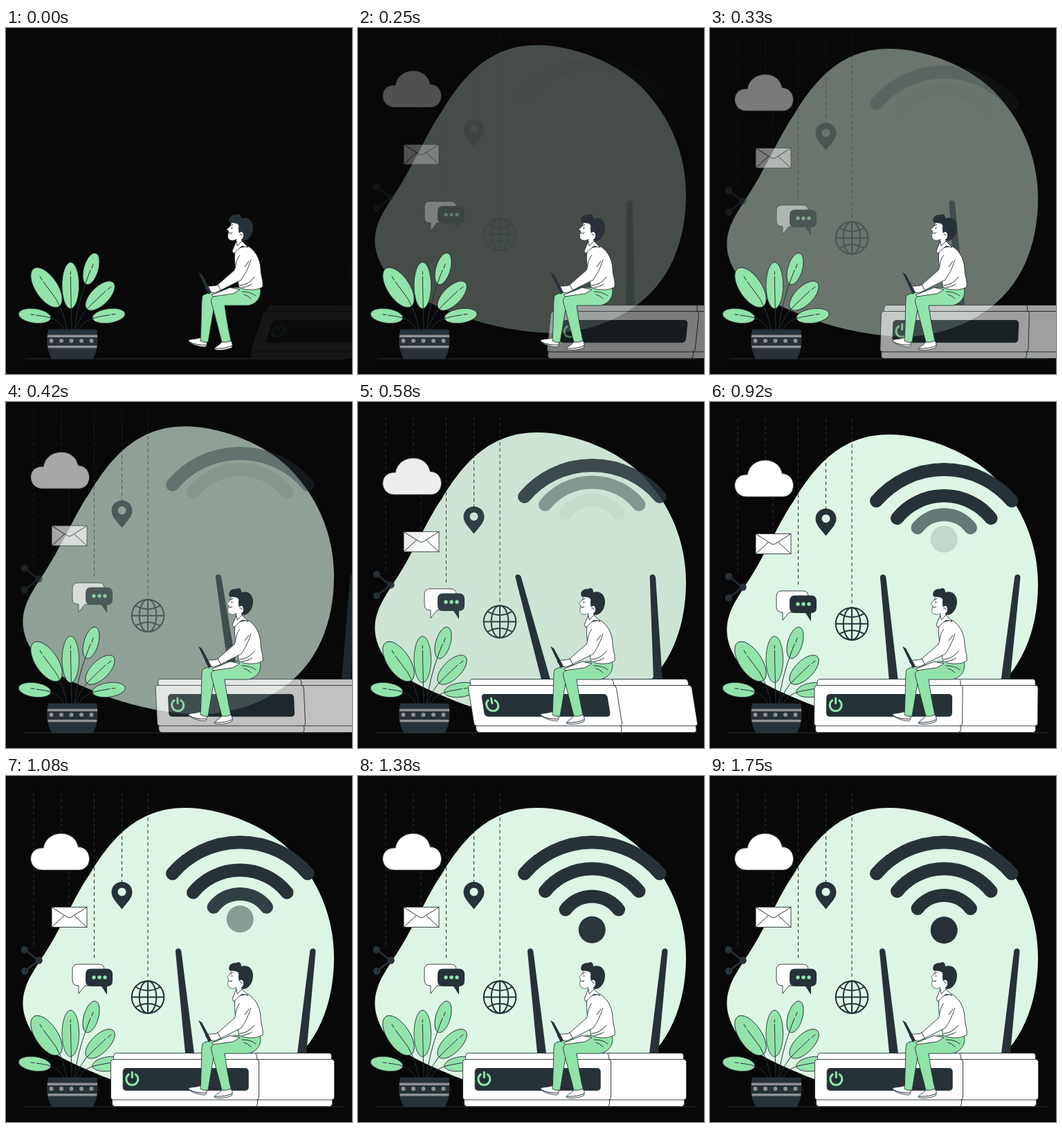
Write an HTML page that moves like this. It is 500 px wide and 500 px high and loops after 1790 ms.

```html
<!DOCTYPE html>
<html lang="en">
<head>
<meta charset="utf-8">
<title>Wireless router</title>
<style>
html, body { margin: 0; width: 100%; height: 100%; overflow: hidden; background: #080808; }
svg { display: block; width: 100vw; height: 100vh; }
.ink { fill: #263238; }
.mint { fill: #92e3a9; }
.white { fill: #fff; }
.out { stroke: #263238; stroke-width: .9; stroke-linejoin: round; }
.line { fill: none; stroke: #263238; stroke-width: 1; stroke-linecap: round; stroke-linejoin: round; }
.dash { stroke-dasharray: 5 4; stroke-linecap: butt; }
.wave { fill: none; stroke: #263238; stroke-width: 19; stroke-linecap: round; }
.grey { fill: #8f9192; }
</style>
</head>
<body>
<svg viewBox="0 0 500 500">
  <path class="line" d="M28 478H490"/>

  <g data-delay="0">
    <path fill="#dcf5e5" d="M258 46C318 46 379 76 410 107C452 150 474 205 474 262C474 330 450 390 398 425C365 449 320 462 278 462C235 462 175 448 140 434C90 413 50 397 33 362C20 335 22 312 38 285C50 265 63 247 75 224C92 194 105 164 121 142C152 90 191 46 258 46Z"/>
  </g>

  <g data-delay="0">
    <path class="line dash" d="M40 24V248M80 24V84M91 136V189M127.500 24V264M167.500 24V153M205 24V291"/>
    <path class="white out" d="M52.500 136C42 136 35.700 128 35.700 119.500C35.700 110 43 103 54 104C56 91 67 83 80 83C93 83 102 91 104.500 102.500C113.500 102.500 120.500 109.500 120.500 119.500C120.500 129 114 136 105 136Z"/>
    <path class="white out" d="M66 189.500H117V218.500H66Z"/>
    <path class="line" d="M66 189.500L88.500 203.800Q91.500 205.800 94.500 203.800L117 189.500M66 218.500L84 202M117 218.500L99 202"/>
    <path class="line" style="stroke-width:2.500" d="M27 251L47 266.500L27 282"/>
    <g class="ink"><circle cx="27" cy="251" r="5.200"/><circle cx="47.500" cy="266.500" r="5.200"/><circle cx="27" cy="282" r="5.200"/></g>
    <path class="white out" d="M104 272H134Q142 272 142 280V295Q142 303 134 303H114L105 314.500V303Q96 303 96 295V280Q96 272 104 272Z"/>
    <path class="ink" d="M123 278.500H146Q154 278.500 154 286.500V296Q154 304 146 304V316L138 304H123Q115 304 115 296V286.500Q115 278.500 123 278.500Z"/>
    <g class="mint"><circle cx="127" cy="291" r="2.700"/><circle cx="135" cy="291" r="2.700"/><circle cx="143" cy="291" r="2.700"/></g>
    <path class="ink" fill-rule="evenodd" d="M167.500 153C176 153 182.500 159.500 182.500 168C182.500 177 173 185 167.500 192.500C162 185 152.500 177 152.500 168C152.500 159.500 159 153 167.500 153ZM161.500 167.500A6 6 0 1 0 173.500 167.500A6 6 0 1 0 161.500 167.500Z"/>
    <g class="line" style="stroke-width:2">
      <circle cx="205" cy="319.500" r="23.300"/><ellipse cx="205" cy="319.500" rx="12.300" ry="23.300"/>
      <path d="M205 296V343M182 319.500H228M187.500 305Q205 315 222.500 305M187.500 334Q205 324 222.500 334"/>
    </g>
  </g>

  <g data-delay="0">
    <path data-delay="0" class="wave" d="M240.500 141A128 128 0 0 1 436 141"/>
    <path data-delay="250" class="wave" d="M270.500 166.500A87 87 0 0 1 406 166.500"/>
    <path data-delay="500" class="wave" d="M300 191.500A48 48 0 0 1 376.500 191.500"/>
    <circle data-delay="750" class="ink" cx="338.200" cy="222.800" r="19.500"/>
  </g>

  <g class="plant">
    <g class="mint out">
      <ellipse rx="16" ry="33" transform="translate(58.500 375) rotate(-34)"/>
      <ellipse rx="12.300" ry="33.500" transform="translate(93.300 372)"/>
      <ellipse rx="10.500" ry="23.500" transform="translate(123 348) rotate(16)"/>
      <ellipse rx="13" ry="27" transform="translate(136 387) rotate(45)"/>
      <ellipse rx="23.500" ry="10.300" transform="translate(41.500 416) rotate(8)"/>
      <ellipse rx="23.800" ry="10.300" transform="translate(148.500 416) rotate(-8)"/>
    </g>
    <path class="line" d="M49 359L52 364M54 367L72 391Q84 412 88 436M93.300 352V356M93.300 359L95 436M126 341L124 347M122 350L117 363Q103 400 99 436M152 374L147 378M144 380L122 401Q106 416 101 436M36 414L41 414.500M44 415L57 417Q76 420 84 436M158 413.500L153 414M150 414.500L131 418Q112 422 105 436"/>
    <path class="ink out" d="M61.500 436H131Q135 461 125.500 478H66.500Q56 461 61.500 436Z"/>
    <path class="grey" d="M60 443.500H132V447H59.800ZM60.200 459H131.500L131 462.500H60.800Z"/>
    <g class="grey"><circle cx="65.500" cy="452" r="3"/><circle cx="80" cy="452" r="3"/><circle cx="94.500" cy="452" r="3"/><circle cx="109" cy="452" r="3"/><circle cx="123.500" cy="452" r="3"/></g>
  </g>

  <g id="router">
    <path class="ink" d="M245 254C244.500 248 252.500 248 253.300 253L272 401H259ZM447.500 254C448 248 440 248 439.200 253L421 401H434Z"/>
    <g class="white out">
      <rect x="358" y="400.500" width="112.500" height="14" rx="4"/>
      <rect x="155.500" y="400.500" width="207" height="14" rx="4"/>
      <rect x="356" y="463" width="115.500" height="14.500" rx="4"/>
      <rect x="153.500" y="463" width="210" height="14.500" rx="4"/>
      <rect x="358" y="409.500" width="116.500" height="58.500" rx="4"/>
      <rect x="151.500" y="409.500" width="214" height="58.500" rx="4"/>
    </g>
    <rect class="ink" x="168.700" y="422" width="182" height="32.700" rx="5"/>
    <path fill="none" stroke="#92e3a9" stroke-width="3" stroke-linecap="round" d="M177.300 431.200A8.500 8.500 0 1 0 187.300 431.200M182.300 428V435.500"/>
  </g>

  <g class="man">
    <path class="white out" d="M282 447C276 450 268 449 264 451C263 455 275 460 287 461C291 460 290 456 290 453Z"/>
    <path class="line" d="M264 453Q275 459 289 458"/>
    <path class="white out" d="M312 453C309 459 302 460 301 464C305 467 320 465 326 462C328 459 327 455 325 452Z"/>
    <path class="line" d="M302 463Q316 464 327 459"/>
    <path class="mint out" d="M340 377C320 379 290 381 284 387C282 391 283 420 281 452Q286 455 292 454L302 394L340 396Z"/>
    <path class="mint out" d="M330 375L367 375C370 385 365 398 350 401L316 401Q320 430 325 452Q319 455 312 454L297 397C295 389 300 387 308 386Z"/>
    <path class="line" d="M341 381Q354 381 361 387M344 385Q350 387 354 391"/>
    <path class="white out" d="M332 319C329 330 331 340 332 352L337 375C349 380 364 379 371 374C372 365 368 358 368 348C367 332 359 320 349 315Z"/>
    <path class="white out" d="M297 386L324 375L338 378L328 384L299 388Z"/>
    <path class="white out" d="M338 328C331 336 333 345 330 350L306 371C301 374 295 372 289 374C287 377 291 379 294 379C293 383 300 384 306 381L340 364C347 354 351 344 354 335"/>
    <path class="line" d="M306 371L310 378M351 337L345 345M338 372Q349 372 359 360M341 375Q350 374 355 370"/>
    <path class="ink" d="M278 353L283 356L297 382L293 385Z"/>
    <path class="ink" d="M323 281C320 275 325 269 333 270C338 267 340 271 340 275C350 272 357 279 357 288C357 298 352 306 344 308L332 304L328 282Z"/>
    <path class="white out" style="stroke-width:.7" d="M326 281C325 285 323 288 319 291L322 294C320 299 320 304 323 306C327 308 331 307 333 305L331 317L346 315L340 306C345 303 344 295 340 294L337 296L336 289C338 286 335 282 332 282Z"/>
    <path class="white out" d="M333 308L327 322L329 326L341 315L350 317L341 308L334 315Z"/>
    <path class="line" d="M324 286L328 284M326.500 288V290M322 296Q325 298 327 296M338 298Q341 297 341 300"/>
  </g>
</svg>
<script>
const LOOP = 1790, LEAD = 33, STEP = 1000 / 24;
const router = document.getElementById('router');
const drops = [...document.querySelectorAll('[data-delay]')];

const bezier = (a, b, s) => 3 * a * s * (1 - s) ** 2 + 3 * b * s * s * (1 - s) + s ** 3;

// Ease with a slight overshoot before settling
function ease(x) {
  if (x <= 0) return 0;
  if (x >= 1) return 1;
  let lo = 0, hi = 1;
  for (let i = 0; i < 24; i++) {
    const mid = (lo + hi) / 2;
    if (bezier(.36, .5, mid) < x) lo = mid; else hi = mid;
  }
  return bezier(-.01, 1.38, lo);
}

function drop(el, t) {
  const p = ease((t - el.dataset.delay) / 1000);
  el.setAttribute('transform', `translate(0 ${30 * (p - 1)})`);
  el.setAttribute('opacity', Math.max(0, Math.min(1, p)));
}

// Slides in from the right, leaning back, then forward, then settling
function slideRouter(t) {
  const p = Math.min(1, t / 600);
  const lean = t < 600 ? -20 + 30 * p
    : t < 800 ? 10 - 12 * (t - 600) / 200
    : Math.min(0, -2 + 2 * (t - 800) / 200);
  const k = Math.tan(lean * Math.PI / 180);
  router.setAttribute('transform', `matrix(1 0 ${k} 1 ${250 * (1 - p) - k * 363.5} 0)`);
  router.setAttribute('opacity', p);
}

// Motion advances at 24 steps a second, with step times rounded to 10 ms
function draw() {
  const step = Math.floor((performance.now() % LOOP + 4) / STEP);
  const t = step * STEP + LEAD;
  drops.forEach(el => drop(el, t));
  slideRouter(t);
  requestAnimationFrame(draw);
}
draw();
</script>
</body>
</html>
```
